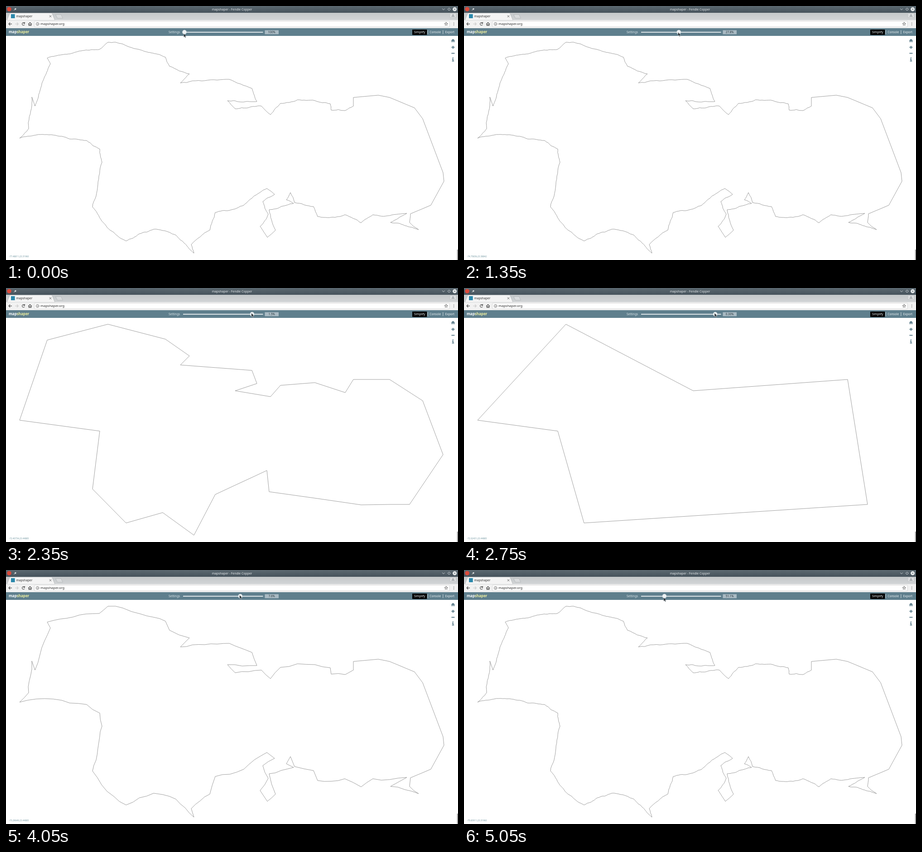
An HTML page that plays this animation: 998 px wide and 561 px high, repeating every 5200 ms.

```html
<!DOCTYPE html>
<html lang="en">
<head>
<meta charset="utf-8">
<title>mapshaper</title>
<style>
  html, body { margin: 0; width: 100%; height: 100%; overflow: hidden; background: #fff; }
  svg { display: block; width: 998px; height: 561px; font: 6.6px "Noto Sans", "Open Sans", sans-serif; }
  .mid { text-anchor: middle; }
  .line { fill: none; stroke: #4c4c4c; stroke-width: 1.1; stroke-linecap: round; stroke-linejoin: round; }
  .thin { stroke-width: .8; }
  .ui { fill: #5f7f8d; }
  #coast { fill: none; stroke: #888; stroke-width: .8; stroke-linejoin: round; }
</style>
</head>
<body>
<svg viewBox="0 0 998 561">
  <defs>
    <linearGradient id="title" x2="0" y2="1">
      <stop stop-color="#5c6971"/><stop offset="1" stop-color="#46535c"/>
    </linearGradient>
    <linearGradient id="strip" x2="0" y2="1">
      <stop stop-color="#c4c8ca"/><stop offset="1" stop-color="#d2d4d6"/>
    </linearGradient>
  </defs>
  <path id="coast"/>

  <!-- window title -->
  <rect width="998" height="15" fill="url(#title)"/>
  <circle cx="7" cy="7" r="4.8" fill="#db4a3b"/>
  <path d="M17.5 9.8l2-2.4M18.6 6l3 2.6M19.6 6.8l1.6-1.8 1.2 1.2-1.6 1.7z" fill="#eee" stroke="#eee" stroke-width=".9"/>
  <text class="mid" x="499" y="9.8" font-size="6.8" fill="#e3e7e9">mapshaper - Fendle Copper</text>
  <path d="M963.2 5.8l2.8 2.8 2.8-2.8M978.3 4.2l3 3-3 3-3-3z" fill="none" stroke="#dfe4e7" stroke-width=".9"/>
  <circle cx="990.7" cy="7.2" r="4.4" fill="#eceff0"/>
  <path d="M989 5.5l3.4 3.4m0-3.4L989 8.9" stroke="#4b5861" stroke-width=".9"/>

  <!-- tabs and address bar -->
  <rect y="15" width="998" height="16.5" fill="url(#strip)"/>
  <path d="M2 31.5L8 17q.6-1.3 2-1.3h90q1.4 0 2 1.3l6 14.5z" fill="#f4f4f4" stroke="#a7abae" stroke-width=".6"/>
  <path d="M109.5 19h12l4 8h-12z" fill="#d9dbdd" stroke="#a7abae" stroke-width=".6"/>
  <rect x="11" y="18" width="8.6" height="9" fill="#2b88ab"/>
  <text x="22.5" y="25" font-size="6.7" fill="#333">mapshaper</text>
  <path d="M96 20.7l4 4m0-4l-4 4" class="line thin"/>
  <rect x="980" y="16.5" width="14" height="9" rx="1" fill="#dcdee0" stroke="#b0b4b7" stroke-width=".5"/>
  <path d="M983.5 23.5q0-2.3 3.5-2.3t3.5 2.3z" fill="#999ea2"/>
  <circle cx="987" cy="19.7" r="1.4" fill="#999ea2"/>

  <rect y="31.5" width="998" height="17.5" fill="#f2f2f2"/>
  <rect x="62.5" y="33.3" width="917" height="12.8" rx="1.2" fill="#fff" stroke="#c6c6c6" stroke-width=".7"/>
  <path class="line" d="M12.5 39.6H6m2.8-2.9L6 39.6l2.8 2.9"/>
  <path class="line" style="stroke:#c9c9c9" d="M20.8 39.6h6.4m-2.8-2.9l2.8 2.9-2.8 2.9"/>
  <path class="line" d="M41 41.3a3 3 0 1 1 0-3.4m.3-1.9v2.4h-2.4"/>
  <path class="line" d="M49.3 40l3.7-3.6 3.7 3.6m-6.3-.5v3.7h1.7v-2.4h1.8v2.4h1.7v-3.7"/>
  <circle class="line thin" cx="69.6" cy="39.7" r="3.2"/>
  <path class="line thin" d="M69.6 39.4v1.9m0-3.5v.2"/>
  <text x="76" y="42.2" font-size="7.5" fill="#2c2c2c">mapshaper.org</text>
  <path class="line thin" d="M971.8 36l1 2.4 2.6.2-2 1.7.6 2.5-2.2-1.4-2.2 1.4.6-2.5-2-1.7 2.6-.2z"/>
  <path class="line" d="M988.8 36.9v.3m0 2.4v.3m0 2.4v.3"/>

  <!-- application bar -->
  <rect class="ui" y="49" width="998" height="17"/>
  <text x="6" y="60.3" font-size="8" font-weight="600" fill="#fff">map<tspan fill="#eef0a0">shaper</tspan></text>
  <text x="359" y="60.2" fill="#dde6ea">Settings</text>
  <rect x="391" y="57" width="176.5" height="1.7" fill="#f5f8f9"/>
  <rect x="571.5" y="53.5" width="30.5" height="8.8" fill="#a9bac3"/>
  <text id="pct" class="mid" x="586.7" y="60.2" font-size="6.3" fill="#26343b"/>
  <rect x="897" y="52" width="32.5" height="12" rx="1" fill="#000"/>
  <g fill="#eef3f5">
    <text x="901" y="60.2">Simplify</text>
    <text x="935.3" y="60.2">Console</text>
    <text x="969.8" y="60.2">Export</text>
    <path d="M930.8 53.5h.8v8.5h-.8zM964.5 53.5h.8v8.5h-.8z"/>
  </g>
  <circle id="knob" cy="57.7" r="4.6" fill="#edf1f3" stroke="#cfd8dc" stroke-width=".5"/>

  <!-- map buttons -->
  <g class="ui">
    <path d="M982.6 76.6l4.4-4.2 4.4 4.2h-1.3v3.5h-2.2v-2.6h-1.8v2.6h-2.2v-3.5z"/>
    <path d="M986 88h2v2.3h2.5v2H988v2.3h-2v-2.3h-2.5v-2h2.5zM983.5 103.4h7v2h-7z"/>
    <path d="M985.8 113.6h2.2v2h-2.2zM985 116.6h3v4.3h1.3v1.6h-4.6v-1.6h1.3v-2.7h-1z"/>
  </g>
  <path d="M996 538h1.4v23H996z" fill="#777"/>
  <text id="coords" x="6.5" y="554.6" font-size="4.8" fill="#7196a0"/>
  <path id="cursor" d="M0 0v8l1.9-1.7 1.3 3 1.4-.6-1.3-2.9h2.5z" fill="#20272b" stroke="#dfe5e8" stroke-width=".5"/>
</svg>

<script>
// Capes and bays, clockwise. "!" stays to the end, "+" goes late, the rest goes first.
const capes = `225,80! 258,84 297,97 352,113+ 361,133 405,150+ 385,170+ 493,162 543,182+ 554,211+
  489,209+ 506,227! 564,221 584,240+ 606,215+ 682,209+ 716,216 718,230 749,231+ 767,221 767,202+
  822,197 847,202! 902,225 920,249+ 965,368+ 967,387 938,440 893,459 891,478! 911,494+ 849,478+
  885,458+ 810,461 784,479+ 748,461 688,465+ 679,443 637,434 628,412+ 619,428 635,436+ 581,450+
  595,495 577,511+ 561,487 579,460 567,432 593,416 576,403+ 525,440 462,456+ 450,495 409,527
  415,546+ 375,506 346,496+ 326,493 265,519! 238,500 191,444+ 212,345 207,316! 178,297 30,292!
  50,271 57,219 57,201 64,221 75,187 98,128 91,115+ 206,96`;

let seed = 7;
const rand = () => (seed = seed * 16807 % 2147483647) / 2147483647;

const parse = s => {
  const [x, y] = s.split(',').map(parseFloat);
  return { x, y, level: s.endsWith('!') ? 0 : s.endsWith('+') ? 1 : 2 };
};

const next = (list, i, step = 1) => list[(i + step + list.length) % list.length];
const area = (a, b, c) => Math.abs((b.x - a.x) * (c.y - a.y) - (c.x - a.x) * (b.y - a.y));

// A point shows while the kept share is at least p.from; large triangles show first.
function rank(pts, level, lo, hi) {
  const kept = pts.filter(p => p.level <= level);
  kept.forEach((p, i) => p.size = area(next(kept, i, -1), p, next(kept, i)));
  const own = kept.filter(p => p.level === level).sort((a, b) => b.size - a.size);
  own.forEach((p, i) => p.from = lo + (hi - lo) * i / own.length);
}

// Midpoint displacement: shorter pieces get smaller bends that appear later.
function bend(a, b) {
  const dx = b.x - a.x, dy = b.y - a.y, len = Math.hypot(dx, dy);
  if (len < 7) return [];
  const off = (rand() - .5) * .13;
  const m = {
    x: (a.x + b.x) / 2 - dy * off,
    y: (a.y + b.y) / 2 + dx * off,
    from: Math.max(.046, 1.8 / len)
  };
  return [...bend(a, m), m, ...bend(m, b)];
}

const smooth = p => p.x > 760 && p.y < 455;

const base = capes.split(/\s+/).map(parse);
rank(base, 0, 0, 0);
rank(base, 1, .0034, .018);
rank(base, 2, .019, .045);
const outline = base.flatMap((p, i) => smooth(p) ? [p] : [p, ...bend(p, next(base, i))]);

// time and slider position
const keys = [[0, 394], [750, 426], [1850, 514], [2750, 554.7], [3050, 554.7],
  [3600, 541], [4400, 493.5], [5050, 442.5]];

const speed = i => (keys[i + 1][1] - keys[i][1]) / (keys[i + 1][0] - keys[i][0]);

// Slope at a key: harmonic mean of both sides, so holds stay flat.
function slope(i) {
  const a = speed(Math.max(i - 1, 0)), b = speed(Math.min(i, keys.length - 2));
  return a * b > 0 ? 2 * a * b / (a + b) : 0;
}

function slider(t) {
  t = Math.min(t, 5050);
  const i = Math.max(1, keys.findIndex(k => k[0] >= t)) - 1;
  const [t0, x0] = keys[i], [t1, x1] = keys[i + 1];
  const span = t1 - t0, u = (t - t0) / span, w = 1 - u;
  return x0 * w * w * (1 + 2 * u) + x1 * u * u * (3 - 2 * u)
    + span * u * w * (slope(i) * w - slope(i + 1) * u);
}

const el = id => document.getElementById(id);
const [coast, knob, cursor, pct, coords] = ['coast', 'knob', 'cursor', 'pct', 'coords'].map(el);

function label(v) {
  return (v >= 99.95 ? '100' : v.toFixed(v < 1 ? 2 : 1)) + '%';
}

function draw(t) {
  const x = slider(t), share = (1 - (x - 394) / 170) ** 2;
  const cx = x - 1.6, drop = 5.5 * Math.min(1, Math.max(0, (500 - x) / 55));
  const pts = outline.filter(p => p.from <= share);
  coast.setAttribute('d', 'M' + pts.map(p => p.x.toFixed(1) + ' ' + p.y.toFixed(1)).join('L') + 'Z');
  knob.setAttribute('cx', x);
  cursor.setAttribute('transform', `translate(${cx} ${55.5 + drop})`);
  pct.textContent = label(share * 100);
  coords.textContent = (-72.02431 + (cx - 553.1) * .034).toFixed(5) + ','
    + (23.44885 - drop * .0235).toFixed(5);
}

const start = performance.now();
let last = -1;
function tick() {
  const t = Math.floor((performance.now() - start) % 5200 / 50) * 50;
  if (t !== last) draw(last = t);
  requestAnimationFrame(tick);
}
tick();
</script>
</body>
</html>
```
